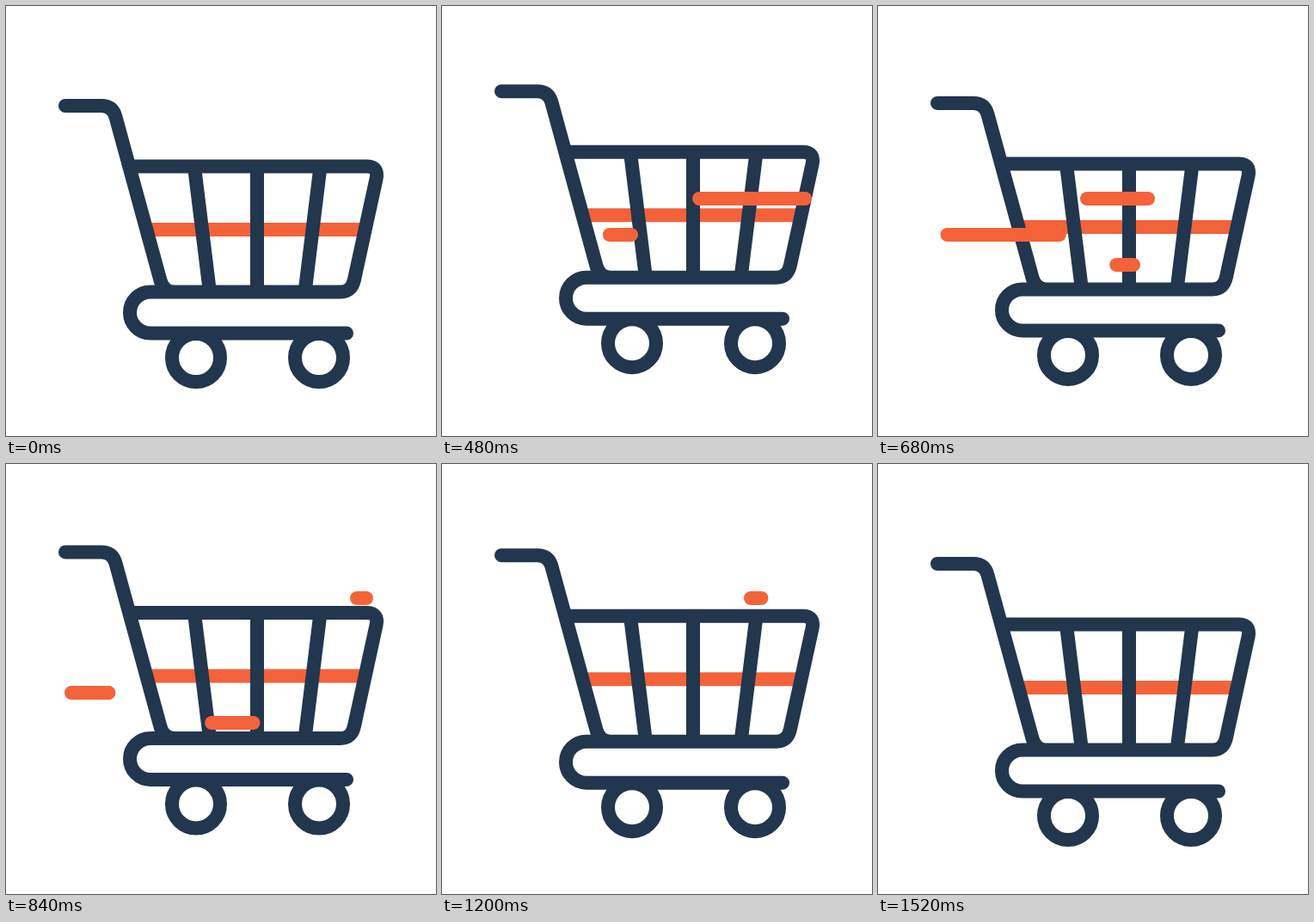
An HTML page with a canvas for the animation above (2 s loop, 500x500 px).

```html
<!DOCTYPE html>
<html lang="en">
<head>
<meta charset="utf-8">
<title>Shopping cart</title>
<style>
  html, body { margin: 0; width: 100%; height: 100%; overflow: hidden; background: #fff; }
  canvas { display: block; }
</style>
</head>
<body>
<canvas id="stage" width="500" height="500"></canvas>
<script>
const ctx = document.getElementById('stage').getContext('2d');
const NAVY = '#22364e';
const ORANGE = '#f4623a';
const LOOP = 2000;
const STEP = 40;
const SWEEP = 252;

// Vertical bounce of the cart: [time, offset]
const bounce = [
  [320, 0], [490, -17], [690, -3], [900, -16], [1105, -5], [1310, -16], [1520, 0]
];

// Speed lines sweep leftwards; the tail follows the head
const streaks = [
  { y: 224, from: 422, to: 243, head: 307, tail: 528 },
  { y: 266, from: 220, to: 76, head: 436, tail: 664 },
  { y: 301, from: 297, to: 237, head: 597, tail: 800 },
  { y: 156, from: 419, to: 359, head: 794, tail: 1000 }
];

const frame = new Path2D(
  'M69 116H111Q124 116 127.5 129L179.5 319Q183 332.5 196 332.5' +
  'M145 186.5H420Q433.500 187 430.5 201L405 318Q402 332.500 389 332.500' +
  'H168A24 24 0 0 0 168 380.500H396'
);
const bars = new Path2D('M219 187L237 333M292 187V333M365.5 187L347.500 333');
const wheels = new Path2D();
for (const x of [221, 364]) {
  wheels.moveTo(x + 28, 409);
  wheels.arc(x, 409, 28, 0, Math.PI * 2);
}

const clamp = v => Math.min(1, Math.max(0, v));

function offsetAt(t) {
  const i = bounce.findIndex(key => key[0] > t);
  if (i < 1) return 0;
  const [t0, y0] = bounce[i - 1];
  const [t1, y1] = bounce[i];
  const ease = (1 - Math.cos(Math.PI * (t - t0) / (t1 - t0))) / 2;
  return y0 + (y1 - y0) * ease;
}

function line(x0, x1, y, cap) {
  ctx.lineCap = cap;
  ctx.strokeStyle = ORANGE;
  ctx.beginPath();
  ctx.moveTo(x0, y);
  ctx.lineTo(x1, y);
  ctx.stroke();
}

function drawCart(t) {
  ctx.save();
  ctx.translate(0, offsetAt(t));
  line(166, 416, 260, 'butt');
  ctx.strokeStyle = NAVY;
  ctx.stroke(bars);
  ctx.lineCap = 'round';
  ctx.stroke(frame);
  ctx.stroke(wheels);
  ctx.restore();
}

function drawStreak({ y, from, to, head, tail }, t) {
  if (t < head || t >= tail + SWEEP) return;
  const at = start => from + (to - from) * clamp((t - start) / SWEEP);
  line(at(tail), at(head), y, 'round');
}

const start = performance.now();

function render() {
  const elapsed = (performance.now() - start) % LOOP;
  const t = Math.floor(elapsed / STEP) * STEP;
  ctx.fillStyle = '#fff';
  ctx.fillRect(0, 0, 500, 500);
  ctx.lineWidth = 16;
  ctx.lineJoin = 'round';
  drawCart(t);
  streaks.forEach(streak => drawStreak(streak, t));
  requestAnimationFrame(render);
}
render();
</script>
</body>
</html>
```
